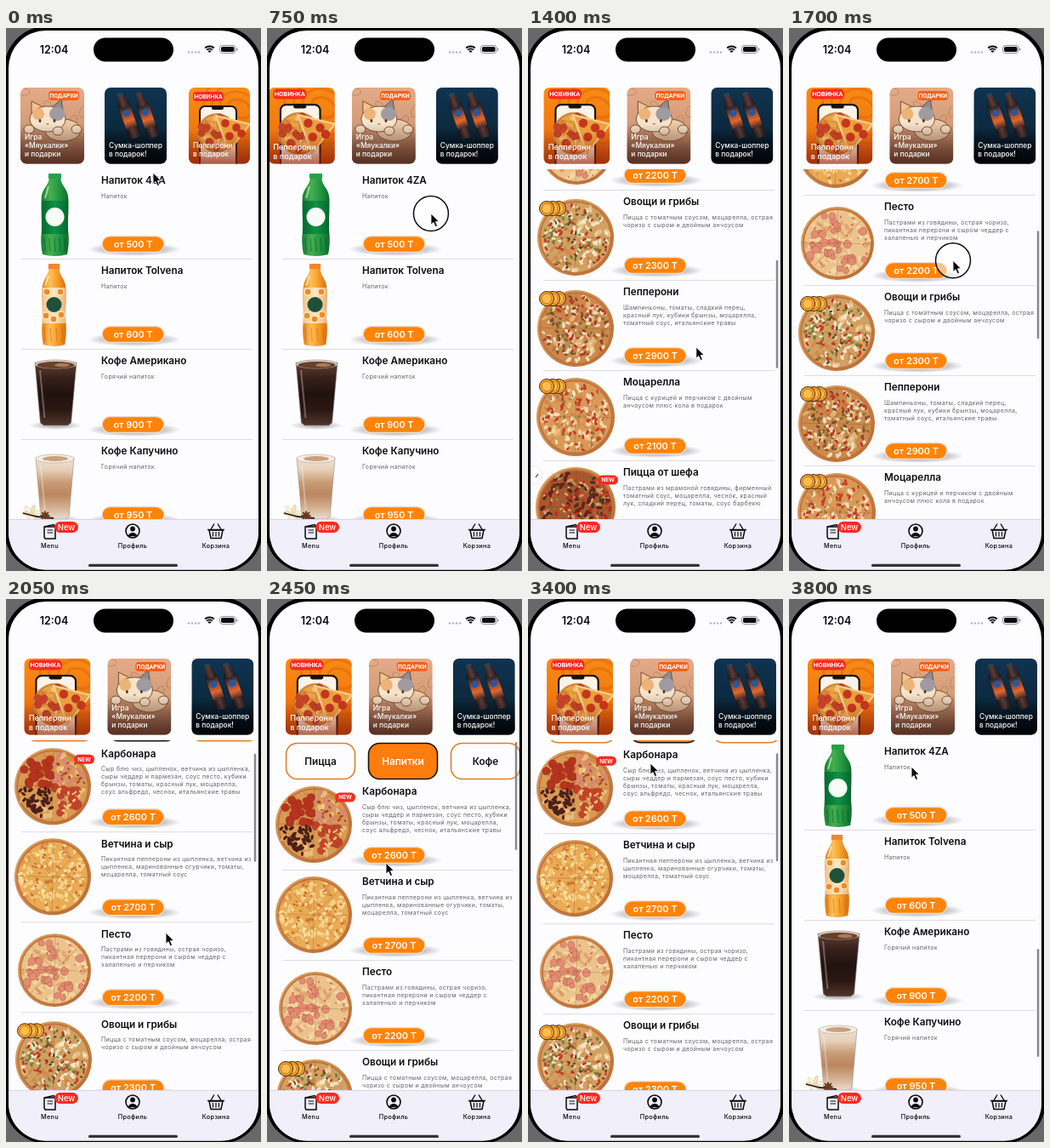
An HTML page with a canvas for the animation above (3.85 s loop, 300 px wide and 638 px high).

```html
<!DOCTYPE html>
<html lang="ru">
<head>
<meta charset="utf-8">
<title>Меню</title>
<style>
html, body { margin: 0; width: 100%; height: 100%; overflow: hidden; background: #000; }
canvas { display: block; width: 300px; height: 638px; }
</style>
</head>
<body>
<canvas id="stage"></canvas>
<script>
const LOOP = 3850, STEP = 50, ROW = 106;
const ORANGE = '#ff8408', RED = '#fb2a20', PAPER = '#fdfcff';
const canvas = document.getElementById('stage');
const g = canvas.getContext('2d');
const dpr = window.devicePixelRatio || 1;
canvas.width = 300 * dpr;
canvas.height = 638 * dpr;

// ---------- drawing helpers ----------
function paint(fill, stroke, width = 1) {
  if (fill) { g.fillStyle = fill; g.fill(); }
  if (stroke) { g.strokeStyle = stroke; g.lineWidth = width; g.stroke(); }
}
function box(x, y, w, h, r, fill, stroke, width) {
  g.beginPath();
  g.roundRect(x, y, w, h, r);
  paint(fill, stroke, width);
}
function oval(x, y, rx, ry, fill, stroke, width, turn = 0) {
  g.beginPath();
  g.ellipse(x, y, rx, ry, turn, 0, 7);
  paint(fill, stroke, width);
}
const disc = (x, y, r, fill, stroke, width) => oval(x, y, r, r, fill, stroke, width);
function poly(points, fill, stroke, width, open) {
  g.beginPath();
  points.forEach(([x, y]) => g.lineTo(x, y));
  if (!open) g.closePath();
  paint(fill, stroke, width);
}
function text(str, x, y, size, weight, color, align = 'left', spacing = 0) {
  g.font = `${weight} ${size}px Inter, sans-serif`;
  g.letterSpacing = spacing + 'px';
  g.textAlign = align;
  g.fillStyle = color;
  g.fillText(str, x, y + size * 0.36);
}
function ramp(x0, y0, x1, y1, ...colors) {
  const grad = g.createLinearGradient(x0, y0, x1, y1);
  colors.forEach((c, i) => grad.addColorStop(i / (colors.length - 1), c));
  return grad;
}
function at(x, y, draw, turn = 0, k = 1) {
  g.save();
  g.translate(x, y);
  g.rotate(turn);
  g.scale(k, k);
  draw();
  g.restore();
}
function glow(x, y, rx, ry, alpha) {
  g.save();
  g.translate(x, y);
  g.scale(rx, ry);
  const grad = g.createRadialGradient(0, 0, 0.3, 0, 0, 1);
  grad.addColorStop(0, `rgba(60,60,70,${alpha})`);
  grad.addColorStop(1, 'rgba(60,60,70,0)');
  disc(0, 0, 1, grad);
  g.restore();
}
function random(seed) {
  return () => {
    seed = (seed * 16807) % 2147483647;
    return seed / 2147483647;
  };
}

// ---------- motion ----------
// Smooth curve through [time, value] keys without overshoot.
function curve(keys) {
  const n = keys.length;
  const rate = i => (keys[i + 1][1] - keys[i][1]) / (keys[i + 1][0] - keys[i][0]);
  const slope = keys.map((_, i) => {
    if (i === 0 || i === n - 1) return 0;
    const a = rate(i - 1), b = rate(i);
    return a * b > 0 ? 2 * a * b / (a + b) : 0;
  });
  return t => {
    if (t <= keys[0][0]) return keys[0][1];
    if (t >= keys[n - 1][0]) return keys[n - 1][1];
    const i = keys.findIndex(k => k[0] > t) - 1;
    const [t0, v0] = keys[i], [t1, v1] = keys[i + 1];
    const d = t1 - t0, u = (t - t0) / d, w = 1 - u;
    return v0 * (1 + 2 * u) * w * w + v1 * u * u * (3 - 2 * u)
      + d * u * w * (slope[i] * w - slope[i + 1] * u);
  };
}
const listY = curve([[750, -563], [850, -540], [950, -495], [1050, -416], [1150, -306],
  [1250, -214], [1400, -114], [1550, -47], [1700, -2], [1800, 25], [1900, 80],
  [2000, 150], [2100, 205], [2220, 231], [2400, 226], [3335, 226], [3795, -563]]);
const pointerX = curve([[0, 173], [700, 192], [950, 196], [1150, 200], [1700, 193],
  [2050, 188], [2450, 140], [2900, 146], [3400, 144], [3800, 144]]);
const pointerY = curve([[0, 170], [250, 180], [650, 217], [750, 218], [850, 241], [950, 286],
  [1050, 361], [1150, 406], [1250, 408], [1400, 375], [1550, 305], [1680, 273], [1720, 274],
  [1800, 300], [1900, 355], [2000, 390], [2150, 394], [2450, 310], [2700, 225],
  [2950, 195], [3400, 193], [3800, 197]]);
const barAlpha = curve([[750, 0], [850, 1], [2700, 1], [2900, 0], [3330, 0], [3390, 1]]);
const carouselX = t => 120 - 103 * Math.exp(-Math.max(0, t - 130) / 380);
const isPressed = t => [[700, 1050], [1650, 1950], [3200, 3300]].some(([a, b]) => t >= a && t <= b);

// ---------- food ----------
// Each topping: [color, size, count, quarter?]
function pizza(x, y, r, seed, cheese, toppings) {
  const rnd = random(seed);
  glow(x, y + 2, r + 3, r + 2, 0.3);
  disc(x, y, r, ramp(x - r, y - r, x + r, y + r, '#dca765', '#b06a2e'));
  disc(x, y, r * 0.95, '#c4703a');
  disc(x, y, r * 0.91, cheese);
  const spot = quarter => {
    const a = quarter === undefined ? rnd() * 6.283 : (quarter + 0.05 + rnd() * 0.9) * 1.571;
    const d = Math.sqrt(rnd()) * r * 0.87;
    return [x + Math.cos(a) * d, y + Math.sin(a) * d];
  };
  for (let i = 0; i < 45; i++) {
    const [px, py] = spot();
    oval(px, py, 2 + rnd() * 4, 1 + rnd() * 2.5, i % 2 ? 'rgba(255,236,180,.42)' : 'rgba(195,85,35,.25)', 0, 0, rnd() * 3);
  }
  for (const [color, size, count, quarter] of toppings) {
    for (let i = 0; i < count; i++) {
      const [px, py] = spot(quarter);
      const s = size * (0.8 + rnd() * 0.4);
      oval(px, py, s, s * (size > 3.5 ? 0.95 : 0.55), color, size > 3.5 ? 'rgba(150,40,20,.35)' : 0, 0.8, rnd() * 3);
    }
  }
  for (let i = 0; i < 4; i++) {
    const a = i * 0.785 + 0.02, dx = Math.cos(a) * r * 0.92, dy = Math.sin(a) * r * 0.92;
    poly([[x - dx, y - dy], [x + dx, y + dy]], 0, 'rgba(120,55,15,.3)', 0.8, true);
  }
}
function bottle(x, top, w, h, colors, cap) {
  const px = u => x + u * w, py = v => top + v * h;
  g.beginPath();
  g.moveTo(px(-0.2), py(0.04));
  g.bezierCurveTo(px(-0.22), py(0.16), px(-0.46), py(0.17), px(-0.48), py(0.3));
  g.bezierCurveTo(px(-0.5), py(0.45), px(-0.45), py(0.6), px(-0.48), py(0.72));
  g.bezierCurveTo(px(-0.51), py(0.8), px(-0.49), py(0.9), px(-0.44), py(0.98));
  g.quadraticCurveTo(px(0), py(1.02), px(0.44), py(0.98));
  g.bezierCurveTo(px(0.49), py(0.9), px(0.51), py(0.8), px(0.48), py(0.72));
  g.bezierCurveTo(px(0.45), py(0.6), px(0.5), py(0.45), px(0.48), py(0.3));
  g.bezierCurveTo(px(0.46), py(0.17), px(0.22), py(0.16), px(0.2), py(0.04));
  paint(ramp(px(-0.5), 0, px(0.5), 0, ...colors));
  box(px(-0.23), top, w * 0.46, h * 0.065, 1, cap);
}
function limeDrink(y) {
  bottle(57.5, y - 8, 33, 97, ['#147a32', '#46b04f', '#229642', '#0d6a2c'], '#27a04a');
  box(42, y + 24, 31, 39, 1, ramp(42, 0, 73, 0, '#05692f', '#0f9145', '#05692f'));
  disc(57.5, y + 43, 11, '#f6fbf5');
  for (let i = 0; i < 5; i++) {
    poly([[45 + i * 6, y + 68], [46 + i * 6, y + 84]], 0, 'rgba(5,80,35,.4)', 1.5, true);
  }
  poly([[50, y + 7], [46, y + 21]], 0, 'rgba(225,255,220,.6)', 2, true);
}
function orangeDrink(y) {
  bottle(56.5, y - 8, 29, 97, ['#dd7a14', '#ffc05a', '#f59a25', '#d56d0d'], '#f4852a');
  box(43, y + 20, 27, 42, 1, ramp(43, 0, 70, 0, '#f0c58d', '#fde9c8', '#e9b578'));
  [[47, 53], [56, 57], [65, 52], [64, 25], [48, 25]].forEach(([x, dy]) =>
    disc(x, y + dy, 4, '#f08a22', '#fff0ce', 1));
  disc(56.5, y + 40, 9, '#20503a');
  for (let i = 0; i < 4; i++) {
    poly([[45 + i * 7, y + 67], [46 + i * 7, y + 84]], 0, 'rgba(200,95,10,.4)', 1.5, true);
  }
  poly([[50, y + 6], [46, y + 18]], 0, 'rgba(255,245,215,.7)', 2, true);
}
function glass(x, top, w, h, ...layers) {
  const a = w / 2, b = w * 0.37;
  glow(x, top + h, w * 0.65, 5, 0.35);
  poly([[x - a, top], [x + a, top], [x + b, top + h - 3], [x + b - 4, top + h], [x - b + 4, top + h], [x - b, top + h - 3]],
    ramp(0, top, 0, top + h, ...layers), 'rgba(150,140,135,.6)', 1);
  poly([[x - a + 6, top + 9], [x - b + 5, top + h - 9]], 0, 'rgba(255,255,255,.3)', 2, true);
}
function americano(y) {
  glass(58.5, y + 2, 49, 74, '#624030', '#37201a', '#21120f', '#2b1712', '#50362b');
  oval(58.5, y + 4, 24.5, 5, '#d8c6b5', '#aaa09a', 0.8);
  oval(58.5, y + 5, 22, 4, '#65402c');
  oval(66, y + 5, 9, 2.2, '#a97c58');
}
function cappuccino(y) {
  glass(57.5, y + 8, 45, 72, '#eee2d5', '#e6cfb7', '#c89b77', '#bb8761', '#d3ad8d', '#e9dcd0');
  oval(57.5, y + 9, 22.5, 5, '#f5eee5', '#bfb5ad', 0.8);
  oval(58, y + 9, 15, 3, '#cda079');
  for (let i = 0; i < 6; i++) {
    oval(30 + 6 * Math.cos(i), y + 72 + 4 * Math.sin(i), 5, 2, i % 2 ? '#f1e4bd' : '#fff6da', '#cdbb8e', 0.5, i);
  }
  poly([[20, y + 73], [36, y + 77], [56, y + 79]], 0, '#3a2018', 1.8, true);
  for (let i = 0; i < 4; i++) oval(46, y + 76, 6, 1.5, '#693b22', 0, 0, i * 0.785);
}

// ---------- badges ----------
function newBadge(x, y) {
  box(x - 12, y - 5.5, 24, 11, 5.5, RED);
  text('NEW', x, y, 6.5, 700, '#fff', 'center');
}
function coins(y) {
  [36, 29, 22].forEach(x => {
    disc(x, y, 8.5, '#f6a52f', '#4b2a10', 1);
    disc(x, y, 5.8, '#ffbd4d', '#b96a16', 0.8);
  });
}
function spicyMark(y) {
  disc(6, y, 10.5, '#fff', '#ddd', 0.6);
  poly([[9, y + 3], [12, y - 1]], 0, '#333', 1.2, true);
}

// ---------- menu ----------
const rows = [
  ['Карбонара', 2600, ['Сыр блю чиз, цыпленок, ветчина из цыпленка,', 'сыры чеддер и пармезан, соус песто, кубики', 'брынзы, томаты, красный лук, моцарелла,', 'соус альфредо, чеснок, итальянские травы'], y => {
    pizza(55, y + 39, 45, 11, '#d89a54', [['#b5341f', 4.6, 24, 2], ['#d98775', 3.4, 30, 3], ['#a8402f', 2, 16, 3], ['#4c1f1a', 3.3, 40, 1], ['#c4442c', 4.6, 15, 0], ['#efc67d', 2.4, 16, 0]]);
    newBadge(92, y + 7);
  }],
  ['Ветчина и сыр', 2700, ['Пикантная пепперони из цыпленка, ветчина из', 'цыпленка, маринованные огурчики, томаты,', 'моцарелла, томатный соус'], y =>
    pizza(55, y + 39, 45, 23, '#e9ab55', [['#f6d58d', 3, 60], ['#d0702f', 2, 46], ['#fbe6ae', 2, 40]])],
  ['Песто', 2200, ['Пастрами из говядины, острая чоризо,', 'пикантная перерони и сыром чеддер с', 'халапенью и перчиком'], y =>
    pizza(57, y + 43, 43, 37, '#ebc38d', [['#f4dca6', 2.8, 40], ['#e28d74', 4.2, 32], ['#d5674f', 1.6, 26]])],
  ['Овощи и грибы', 2300, ['Пицца с томатным соусом, моцарелла, острая', 'чоризо с сыром и двойным анчоусом'], y => {
    pizza(56, y + 42, 45, 41, '#d2a062', [['#f2e6c6', 3, 70], ['#72803c', 2.4, 40], ['#c23a26', 2.5, 38], ['#48482b', 1.8, 26]]);
    coins(y + 8);
  }],
  ['Пепперони', 2900, ['Шампиньоны, томаты, сладкий перец,', 'красный лук, кубики брынзы, моцарелла,', 'томатный соус, итальянские травы'], y => {
    pizza(56, y + 43, 45, 59, '#cb8a4c', [['#efdcb8', 3, 65], ['#b83a25', 2.6, 46], ['#6c7636', 2.2, 32], ['#7e4c2d', 2.6, 30]]);
    coins(y + 8);
  }],
  ['Моцарелла', 2100, ['Пицца с курицей и перчиком с двойным', 'анчоусом плюс кола в подарок'], y => {
    pizza(56, y + 41, 46, 67, '#d99a58', [['#f4dfb4', 3, 62], ['#c63d27', 2.6, 58], ['#738341', 1.6, 22], ['#b9704a', 2.5, 18]]);
    coins(y + 5);
  }],
  ['Пицца от шефа', 3400, ['Пастрами из мрамоной говядины, фирменный', 'томатный соус, моцарелла, чеснок, красный', 'лук, сладкий перец, томаты, соус барбекю'], y => {
    pizza(56, y + 41, 47, 73, '#a8582f', [['#5c261c', 3.3, 75], ['#b22f20', 2.8, 55], ['#e0b478', 2, 26], ['#5d6e30', 2, 40]]);
    newBadge(94, y + 9);
    spicyMark(y + 3);
  }],
  ['Напиток 4ZA', 500, ['Напиток'], limeDrink],
  ['Напиток Tolvena', 600, ['Напиток'], orangeDrink],
  ['Кофе Американо', 900, ['Горячий напиток'], americano],
  ['Кофе Капучино', 950, ['Горячий напиток'], cappuccino],
];

function drawRow([title, price, lines, art], y) {
  art(y);
  text(title, 112, y, 11.7, 600, '#0b0b0d');
  lines.forEach((line, i) => text(line, 112, y + 18 + i * 9, 7, 400, '#626267', 'left', 0.35));
  glow(151, y + 81, 55, 8, 0.55);
  box(113, y + 65.5, 73, 19, 9.5, ORANGE, '#e9dfd6', 1.5);
  text(`от ${price} Т`, 149.5, y + 75, 10.9, 600, '#fff', 'center');
  box(18, y + 92, 272, 1, 0, '#dddce0');
}
function drawTabs(y) {
  ['Пицца', 'Напитки', 'Кофе'].forEach((name, i) => {
    const x = 22.5 + i * 97, active = i === 1;
    box(x, y - 21, 81, 42, 13, active ? '#ff7d0c' : PAPER, active ? '#15100c' : '#df7f2c', 1.6);
    text(name, x + 40.5, y, 11.7, 600, active ? '#fff' : '#111', 'center');
  });
}
function drawList(t) {
  const top = listY(t);
  g.save();
  g.beginPath();
  g.rect(3, 166, 294, 411);
  g.clip();
  drawTabs(top - 35.5);
  rows.forEach((row, i) => {
    const y = top + i * ROW;
    if (y > 60 && y < 600) drawRow(row, y);
  });
  g.globalAlpha = barAlpha(t);
  box(291.8, 168 + (226 - top) * 0.308, 2.4, 127, 1.2, '#88888c');
  g.restore();
}

// ---------- carousel ----------
function tag(label, x, y, w, color) {
  box(x, y, w, 11, 4, color);
  g.font = '700 7px Roboto, sans-serif';
  g.letterSpacing = '0px';
  g.textAlign = 'center';
  g.fillStyle = '#fff';
  g.fillText(label, x + w / 2, y + 8);
}
function caption(...lines) {
  lines.forEach((line, i) => text(line, 5, 78 - (lines.length - 1 - i) * 10, 8.4, 500, '#fff'));
}
function pizzaCard() {
  box(0, 0, 72, 90, 0, ramp(0, 0, 0, 90, '#f88d14', '#f27a10', '#c24a10'));
  for (let i = 0; i < 4; i++) oval(60, 25, 14 + i * 10, 10 + i * 9, 0, 'rgba(215,85,5,.35)', 3, 0.5);
  box(13, 22, 43, 75, 6, '#fbf3e8', '#17110f', 2);
  box(27, 22, 14, 4, 2, '#17110f');
  pizza(33, 53, 23, 83, '#e9a443', [['#c8432a', 3.8, 16]]);
  poly([[32, 33], [72, 43], [47, 75]], '#eaa03f', '#f3cf92', 2);
  [[43, 42], [56, 47], [48, 57], [62, 54]].forEach(([x, y]) => disc(x, y, 4.8, '#c5361f'));
  box(0, 52, 72, 38, 0, ramp(0, 52, 0, 90, 'rgba(150,40,5,0)', 'rgba(140,36,8,.75)'));
  tag('НОВИНКА', 5, 5, 36, RED);
  caption('Пепперони', 'в подарок');
}
function catCard() {
  const line = '#79503c';
  box(0, 0, 75, 90, 0, ramp(0, 0, 0, 90, '#e3ab88', '#d39b76', '#815340'));
  for (let i = 0; i < 7; i++) {
    oval((i * 29 + 4) % 75, (i * 17 + 5) % 62, 7, 4, 0, 'rgba(150,88,62,.45)', 0.9, i);
  }
  oval(50, 50, 21, 13, '#e9c9a6', line);
  poly([[13, 32], [13, 16], [27, 23]], '#f2c290', line);
  poly([[37, 23], [48, 14], [51, 33]], '#8e8b93', line);
  oval(32, 37, 21, 15, '#f5e3ca', line);
  oval(43, 31, 9, 8, '#a09ba0');
  oval(21, 31, 7, 7, '#edb377');
  [23, 40].forEach(x => oval(x, 39, 1.4, 2, '#4a3028'));
  poly([[30, 42], [34, 42], [32, 44]], '#c0685a');
  [[10, 49], [44, 51], [66, 49]].forEach(([x, y]) => oval(x, y, 6, 5, '#f5dfc3', line));
  box(0, 42, 75, 48, 0, ramp(0, 42, 0, 90, 'rgba(85,45,30,0)', 'rgba(75,40,28,.8)'));
  tag('ПОДАРКИ', 33, 4, 36, '#f8601b');
  caption('Игра', '«Мяукалки»', 'и подарки');
}
function bagCard() {
  box(0, 0, 73, 90, 0, ramp(0, 0, 0, 90, '#0f3350', '#0c2a40', '#05090e'));
  [[27, 33], [49, 32]].forEach(([x, y]) => at(x, y, () => {
    bottle(0, -28, 15, 56, ['#131215', '#5c3a36', '#17161b'], '#33404c');
    box(-6.8, -11, 13.6, 26, 1, ramp(0, -11, 0, 15, '#1c2733', '#9c4526', '#e0672e', '#4a2a26'));
    disc(0, -3, 4, '#2458a5');
  }, -0.34));
  box(0, 50, 73, 40, 0, ramp(0, 50, 0, 90, 'rgba(0,5,10,0)', 'rgba(0,4,8,.85)'));
  caption('Сумка-шоппер', 'в подарок!');
}
function drawCarousel(t) {
  const x = carouselX(t), top = 70, h = 89.5;
  [[pizzaCard, -98, 78, 1.083], [catCard, 0, 75, 1], [bagCard, 99, 73, 1], [pizzaCard, 198, 72, 1]]
    .forEach(([draw, dx, w, k]) => {
      g.save();
      g.beginPath();
      g.roundRect(x + dx, top, w, h, 7);
      g.clip();
      at(x + dx, top - h * (k - 1) / 2, draw, 0, k);
      g.restore();
    });
}

// ---------- phone ----------
function drawStatus() {
  box(103, 11.5, 94, 28, 14, '#000');
  text('12:04', 56.5, 25, 12.5, 600, '#08080a', 'center');
  for (let i = 0; i < 4; i++) disc(215 + i * 4, 28.5, 1.2, '#b5b4bb');
  [2, 5, 8].forEach(r => {
    g.beginPath();
    g.arc(239.5, 29.5, r, -2.3, -0.84);
    paint(0, '#0b0b0d', 2);
  });
  box(251.5, 20.5, 18.5, 9, 3, 0, '#8c8c92', 1);
  box(253, 22, 15.5, 6, 1.7, '#0b0b0d');
  box(271, 23.5, 1.3, 3, 0.6, '#8c8c92');
}
function drawTabBar() {
  const ink = '#09090b';
  box(3, 577, 294, 61, 0, '#f0effa');
  box(3, 577, 294, 0.8, 0, '#d2d1da');
  poly([[45, 586], [56, 583.5], [58, 586], [58, 600], [46, 600], [45, 598]], '#f0effa', ink, 1.5);
  poly([[45, 586], [58, 586]], 0, ink, 1.4, true);
  [590, 593].forEach(y => poly([[48.5, y], [55, y]], 0, ink, 1.1, true));
  box(57, 580, 28, 13, 6.5, RED);
  text('New', 71, 586.5, 9.5, 500, '#fff', 'center');

  disc(149, 591, 8, 0, ink, 1.6);
  disc(149, 588.5, 2.9, ink);
  g.beginPath();
  g.ellipse(149, 597.3, 5.2, 4.4, 0, Math.PI, 0);
  paint(ink);

  poly([[239, 590], [255, 590], [253, 599.5], [241, 599.5]], 0, ink, 1.5);
  poly([[237, 589.5], [257, 589.5]], 0, ink, 1.6, true);
  poly([[241, 589], [245, 582.5]], 0, ink, 1.4, true);
  poly([[253, 589], [249, 582.5]], 0, ink, 1.4, true);
  [243.5, 247, 250.5].forEach(x => poly([[x, 592], [x, 597.5]], 0, ink, 1.2, true));

  [['Menu', 51.5], ['Профиль', 149], ['Корзина', 247]].forEach(([name, x]) =>
    text(name, x, 608.5, 7.3, 500, ink, 'center', 0.3));
  box(97, 629.8, 105, 3.2, 1.6, '#333338');
}
function drawPointer(t) {
  const x = pointerX(t), y = pointerY(t);
  if (isPressed(t)) disc(x, y, 20.5, 'rgba(255,255,255,.5)', '#0c0c0e', 1.5);
  at(x, y, () => poly([[0, 0], [0, 13.2], [3, 10.5], [5.2, 15.6], [7.6, 14.6], [5.4, 9.6], [9.4, 9.4]],
    '#050506', '#fff', 0.9));
}

function render(t) {
  g.setTransform(dpr, 0, 0, dpr, 0, 0);
  box(0, 0, 300, 638, 0, '#68686a');
  box(-2, -2, 304, 642, 50, '#000');
  g.save();
  g.beginPath();
  g.roundRect(3, 3, 294, 633.5, 44);
  g.clip();
  box(0, 0, 300, 638, 0, PAPER);
  drawList(t);
  drawCarousel(t);
  drawStatus();
  drawTabBar();
  drawPointer(t);
  g.restore();
}

const start = performance.now();
function tick() {
  const t = (performance.now() - start) % LOOP;
  render(Math.floor(t / STEP) * STEP);
  requestAnimationFrame(tick);
}
tick();
</script>
</body>
</html>
```
